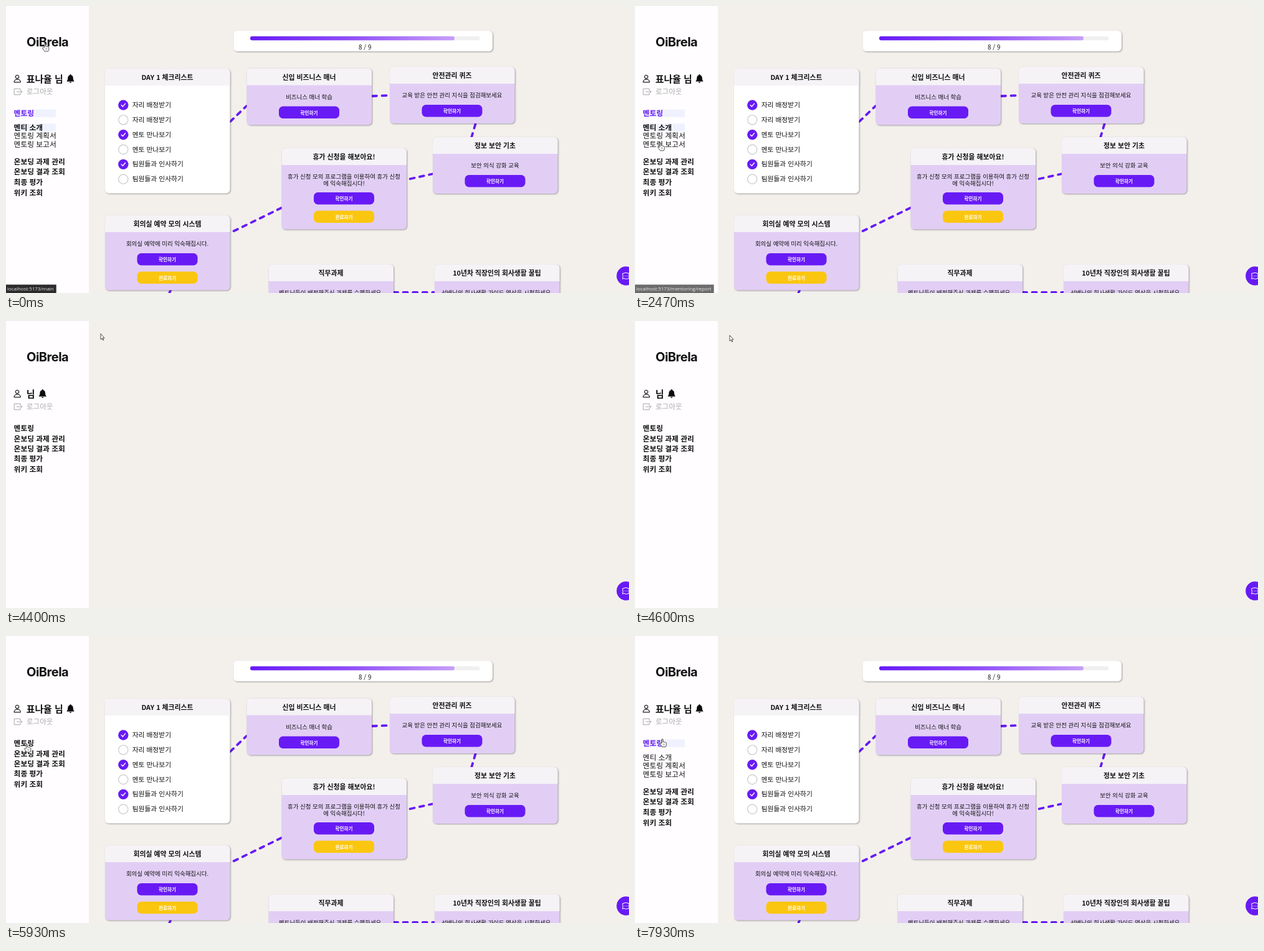
Animation of 1000x462 px, one loop 8 s. Source, as an HTML page:

```html
<!DOCTYPE html>
<html lang="ko">
<head>
<meta charset="utf-8">
<style>
  html, body { margin: 0; width: 100%; height: 100%; overflow: hidden; background: #f3f0ec; }
  svg { display: block; width: 100%; height: 100%; }
  text { font-family: "Noto Sans CJK KR", "Noto Sans CJK", "Noto Sans", sans-serif; white-space: pre; }
  .panel { filter: drop-shadow(1px 1px 1.2px rgba(0, 0, 0, .35)); }
  #brand { font-family: Inter, sans-serif; letter-spacing: -.5px; }
  #statusText { font-family: "Open Sans", sans-serif; }
</style>
</head>
<body>
<svg id="stage" viewBox="0 0 1000 462"></svg>
<script>
const PURPLE = '#681af5', YELLOW = '#fbc60f', LILAC = '#e2cef5', HEADER = '#f5f3f6', HILITE = '#eff2fe';
const RELOAD = 4400, LOADED = 4900, EXPAND = 7930, LOOP = 8000;

// Text whose vertical middle lies at y
const text = (x, y, size, str, { fill = '#111', bold = false, anchor = 'start', id = '' } = {}) =>
  `<text id="${id}" x="${x}" y="${y + size * .37}" font-size="${size}" fill="${fill}" font-weight="${bold ? 700 : 400}" text-anchor="${anchor}">${str}</text>`;
const centered = (x, y, size, str, opts) => text(x, y, size, str, { anchor: 'middle', ...opts });
const rect = (x, y, w, h, fill, r = 0) => `<rect x="${x}" y="${y}" width="${w}" height="${h}" rx="${r}" fill="${fill}"/>`;
const line = (d, stroke, width, extra = '') =>
  `<path d="${d}" fill="none" stroke="${stroke}" stroke-width="${width}" stroke-linecap="round" stroke-linejoin="round" ${extra}/>`;
const group = (id, body) => `<g id="${id}">${body}</g>`;

function panel(x, y, h, title, fill, body) {
  return `<g class="panel">${rect(x, y, 200.5, h, fill, 6)}
    <path d="M${x} ${y + 27}v-21a6 6 0 0 1 6-6h188.5a6 6 0 0 1 6 6v21z" fill="${HEADER}"/></g>` +
    centered(x + 100, y + 14, 10.85, title, { bold: true }) + body;
}

function button(cx, y, label, fill) {
  return rect(cx - 48.5, y, 97, 19.5, fill, 6.5) + centered(cx, y + 10.3, 7.6, label, { fill: '#fff', bold: true });
}

function card(x, y, title, lines, canFinish = false) {
  const cx = x + 100, top = y + 61 + (lines.length - 1) * 10;
  let body = lines.map((s, i) => centered(cx, y + 45.7 + i * 11, 9.45, s)).join('') + button(cx, top, '확인하기', PURPLE);
  if (canFinish) body += button(cx, top + 29.5, '완료하기', YELLOW);
  return panel(x, y, top - y + (canFinish ? 59.5 : 30), title, LILAC, body);
}

function checklist() {
  const items = ['자리 배정받기', '멘토 만나보기', '팀원들과 인사하기'].flatMap(s => [s, s]);
  return panel(159, 101, 200.5, 'DAY 1 체크리스트', '#fff', items.map((label, i) => {
    const y = 159.5 + i * 23.85, done = i % 2 === 0;
    return `<circle cx="188.3" cy="${y}" r="${done ? 8.2 : 7.6}" fill="${done ? PURPLE : '#fff'}" ${done ? '' : 'stroke="#c9c9c9" stroke-width="1.2"'}/>` +
      (done ? line(`M185.2 ${y}l2.3 2.4 4-4.8`, '#fff', 1.4) : '') + text(202.7, y - .5, 10.75, label);
  }).join(''));
}

const progress = `<g class="panel">${rect(365.5, 40, 415.5, 33, '#fff', 6)}</g>` +
  rect(392, 48.7, 368.5, 6.6, '#f1f0f1', 3.3) + rect(392, 48.7, 328, 6.6, 'url(#bar)', 3.3) +
  centered(576.3, 66, 9.9, '8 / 9');

const route = line('M360 186L386 161M588 145L616 144M753.5 190L747 212M686 270L643 279.5M442 325L360 365M264 458L261 465M622 461H689',
  PURPLE, 3.8, 'stroke-dasharray="7 8.6"');

const content = route + progress + checklist() +
  card(386.5, 100.5, '신입 비즈니스 매너', ['비즈니스 매너 학습']) +
  card(616, 98, '안전관리 퀴즈', ['교육 받은 안전 관리 지식을 점검해보세요']) +
  card(685, 211, '정보 보안 기초', ['보안 의식 강화 교육']) +
  card(442.5, 229, '휴가 신청을 해보아요!', ['휴가 신청 모의 프로그램을 이용하여 휴가 신청', '에 익숙해집시다!'], true) +
  card(159, 337, '회의실 예약 모의 시스템', ['회의실 예약에 미리 익숙해집시다.'], true) +
  card(421.5, 416, '직무과제', ['멘토님들이 배정해주신 과제를 수행하세요.']) +
  card(688, 416, '10년차 직장인의 회사생활 꿀팁', ['선배님의 회사생활 가이드 영상을 시청하세요.']);

const menuItem = (y, str, opts = { bold: true }) => text(12.6, y, 11.75, str, opts);
const mainItems = ys => ['온보딩 과제 관리', '온보딩 결과 조회', '최종 평가', '위키 조회'].map((s, i) => menuItem(ys[i], s)).join('');

const sidebar = rect(0, 0, 133, 462, '#fffdff') +
  text(33, 57.6, 20, 'OiBrela', { bold: true, id: 'brand' }) +
  line('M18 111.3a2.7 2.7 0 1 1-.01 0M13 122.6c0-6 10.4-6 10.4 0z', '#222', 1.2) +
  text(32.7, 117, 14.9, '', { bold: true, id: 'user' }) +
  group('bell', '<path d="M0-7q1.2 0 1.2 1.3Q4.3-4.7 4.3-.5q0 3.5 1.9 4.9H-6.2Q-4.3 3-4.3-.5q0-4.2 3.1-5.2Q-1.2-7 0-7zM-1.7 5.2h3.4q-.3 1.6-1.7 1.6t-1.7-1.6z" fill="#0b0b0b"/>') +
  line('M23 135.5v-2.3H13.2v9.6H23v-2.3M17.5 138h8.3m-2.2-2.2l2.2 2.2-2.2 2.2', '#a5a5a5', 1) +
  text(33, 137.5, 11.5, '로그아웃', { fill: '#aaa' }) +
  group('closed', menuItem(173, '멘토링') + mainItems([189.3, 205.6, 222, 239])) +
  group('open', rect(13, 166.5, 67, 12.5, HILITE) + menuItem(173, '멘토링', { fill: PURPLE, bold: true }) +
    group('menteeOn', rect(13, 189.3, 67, 12.5, HILITE) + menuItem(195.7, '멘티 소개')) +
    group('menteeOff', menuItem(195.7, '멘티 소개', {})) +
    menuItem(209, '멘토링 계획서', {}) + menuItem(222.3, '멘토링 보고서', {}) + mainItems([250.5, 267, 283.3, 300.3]));

const chat = `<circle cx="995.3" cy="434.5" r="15.2" fill="${PURPLE}"/>` +
  line('M990 430.5q5-2.5 10 0v8q-5 2.2-8 0l-2.5.8.7-3zM993 434.7h.1M995.5 434.7h.1M998 434.7h.1', '#fff', 1);

const status = group('status', '<rect id="statusBox" y="448.5" height="14" fill="#2c2c2c"/>' +
  text(2, 455.2, 7.9, '', { fill: '#e4e4e4', id: 'statusText' }));

const cursors =
  group('hand', '<path d="M-1 7V1.2a1 1 0 0 1 2 0V5q1.7-.7 2 .4 1.5-.5 1.8.6 1.5-.3 1.5 1.1V9.5q0 2.2-1.3 3.5H-.4Q-1.5 11.3-3.8 8.4c-.8-1.2.7-2.1 1.7-1.1z" fill="#fff" stroke="#222" stroke-width=".8"/><path d="M1.4 7.5v3M3.2 7.5v3" stroke="#444" stroke-width=".5"/>') +
  group('arrow', '<path d="M0 0V9.2L2.1 7.3 3.5 10.6 4.9 10 3.5 6.8H6z" fill="#fff" stroke="#222" stroke-width=".8"/>');

const el = id => document.getElementById(id);
const show = (id, on) => el(id).style.display = on ? '' : 'none';
const place = (id, x, y) => el(id).setAttribute('transform', `translate(${x} ${y})`);

el('stage').innerHTML = `<defs><linearGradient id="bar"><stop stop-color="${PURPLE}"/><stop offset=".5" stop-color="#9150f7"/><stop offset="1" stop-color="#c79ff8"/></linearGradient></defs>` +
  group('content', content) + sidebar + chat + status + cursors;

// Pointer stops: time, x, y
const stops = [
  [0, 62.5, 60], [70, 63, 60], [600, 91, 65], [1730, 91, 65], [2450, 41, 220], [2540, 41, 219],
  [3400, 54, 12.5], [3470, 56, 12], [3670, 152, 11], [3930, 152, 11], [4600, 152, 23],
  [4850, 150, 2], [5100, 148, 6], [5600, 111, 106], [5930, 33.5, 174],
  [6200, .5, 191], [6670, .5, 191], [7470, 38, 174], [7730, 44, 165.5], [LOOP, 44, 165.5]
];

function pointer(t) {
  const i = stops.findIndex(s => s[0] > t);
  const [t0, x0, y0] = stops[i - 1], [t1, x1, y1] = stops[i];
  const p = (t - t0) / (t1 - t0), e = p * p * (3 - 2 * p);
  return [x0 + (x1 - x0) * e, y0 + (y1 - y0) * e];
}

// Link previews: start, end, path
const previews = [
  [-200, 1850, '/main'], [2180, 2540, '/mentoring/report'], [2660, 2900, '/mentoring'], [3080, 3330, '/main']
];

function drawStatus(t) {
  const preview = previews.find(([start, end]) => t >= start && t < end);
  show('status', preview);
  if (!preview) return;
  const [start, end, path] = preview;
  const label = el('statusText');
  label.textContent = 'localhost:5173' + path;
  el('statusBox').setAttribute('width', label.getComputedTextLength() + 6);
  el('status').setAttribute('opacity', Math.min(1, (t - start) / 100, (end - t) / 100));
}

function draw() {
  const t = performance.now() % LOOP;
  const loaded = t < RELOAD || t >= LOADED, expanded = t < RELOAD || t >= EXPAND;
  show('content', loaded);
  show('open', expanded);
  show('closed', !expanded);
  show('menteeOn', t < RELOAD);
  show('menteeOff', t >= RELOAD);
  el('user').textContent = loaded ? '표나율 님' : '님';
  place('bell', loaded ? 103.5 : 58.7, 117);
  drawStatus(t);

  const [x, y] = pointer(t);
  const overLink = x > 12 && x < 104 && ((y > 45 && y < 75) || (y > 165 && y < 310));
  show('hand', overLink);
  show('arrow', !overLink);
  place(overLink ? 'hand' : 'arrow', x, y);
  requestAnimationFrame(draw);
}
draw();
</script>
</body>
</html>
```
